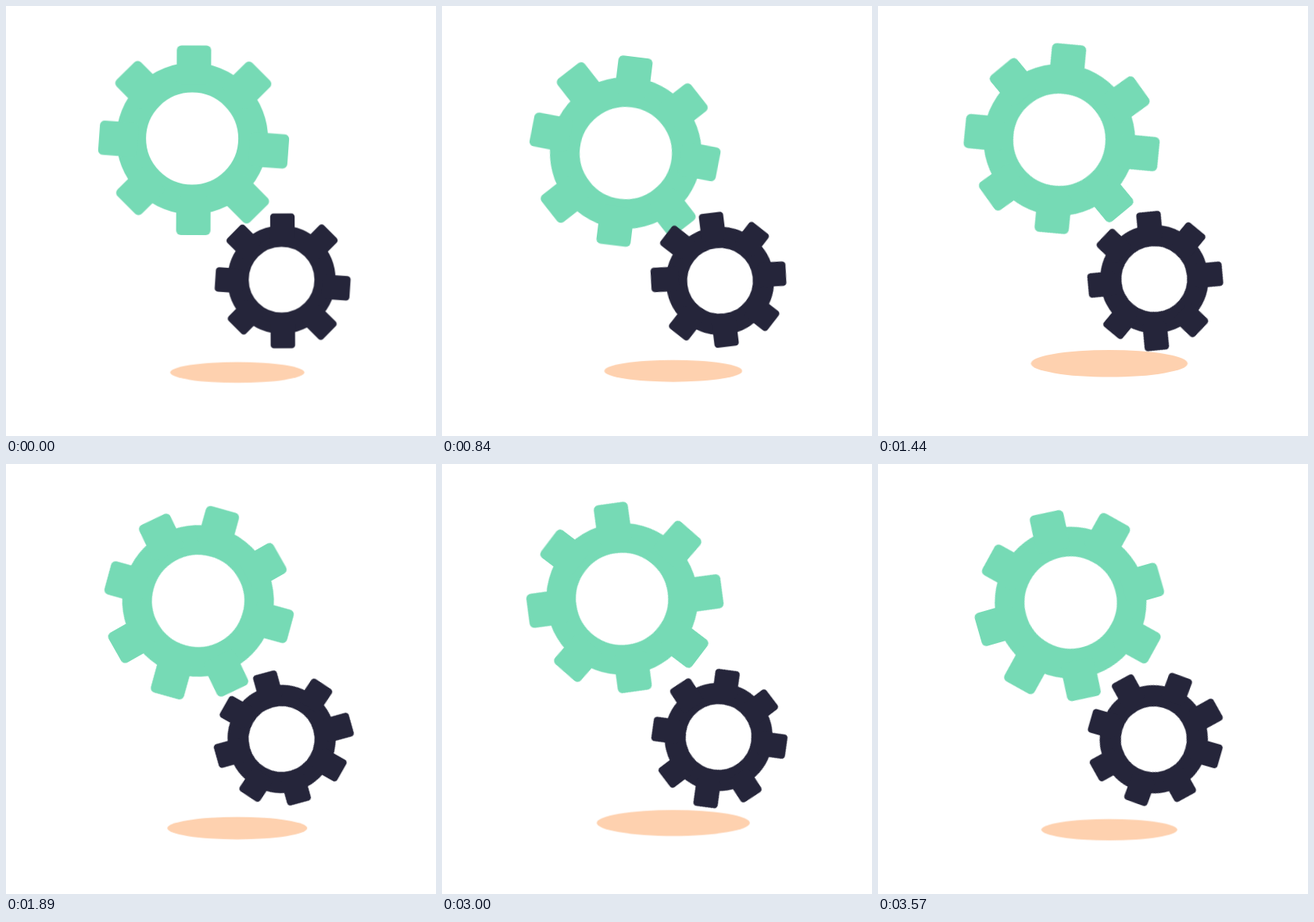
An HTML page for the animation above (3.6 s loop, 550x550 px).

```html
<!DOCTYPE html>
<html lang="en">
<head>
<meta charset="utf-8">
<title>Turning gears</title>
<style>
  html, body { margin: 0; width: 100%; height: 100%; overflow: hidden; background: #fff; }
  svg { display: block; width: 100vw; height: 100vh; }

  .spin { animation: spin 3600ms linear infinite; }
  .large { color: #76dab5; transform-origin: 237.15px 178.9px; --turn: 800.4deg; }
  .small { color: #25253a; transform-origin: 354px 350.9px; --turn: -800.4deg; }
  .shadow { fill: #fed1af; animation: swell 900ms linear infinite; }

  @keyframes spin {
    from { transform: rotate(0deg); }
    to { transform: rotate(var(--turn)); }
  }
  @keyframes swell {
    0%, 100% { transform: translate(0px, 0px) scale(1, 1); }
    50% { transform: translate(0px, -14.4px) scale(1.21, 1.38); }
  }
</style>
</head>
<body>
<svg viewBox="0 0 550 550">
  <defs>
    <rect id="tooth" x="-22" width="44" height="50" rx="6"/>
    <!-- Hub at 0,0; each tooth is placed by the middle of its outer edge. -->
    <g id="gear" fill="currentColor">
      <circle r="78" fill="none" stroke="currentColor" stroke-width="38"/>
      <use href="#tooth" transform="translate(1.9 -119.1)"/>
      <use href="#tooth" transform="translate(87.9 -85.8) rotate(45)"/>
      <use href="#tooth" transform="translate(122.9 16.4) rotate(94)"/>
      <use href="#tooth" transform="translate(85.6 95.4) rotate(135)"/>
      <use href="#tooth" transform="translate(1.9 123.4) rotate(180)"/>
      <use href="#tooth" transform="translate(-83.9 85.2) rotate(225)"/>
      <use href="#tooth" transform="translate(-119.1 -1.1) rotate(274)"/>
      <use href="#tooth" transform="translate(-85.6 -86.1) rotate(315)"/>
    </g>
  </defs>

  <g transform="translate(295.8 468.7)">
    <ellipse class="shadow" rx="85.8" ry="13.3"/>
  </g>
  <g class="spin large">
    <use href="#gear" transform="translate(238.1 169.6)"/>
  </g>
  <g class="spin small">
    <use href="#gear" transform="translate(352.5 350) scale(.712)"/>
  </g>
</svg>
</body>
</html>
```
